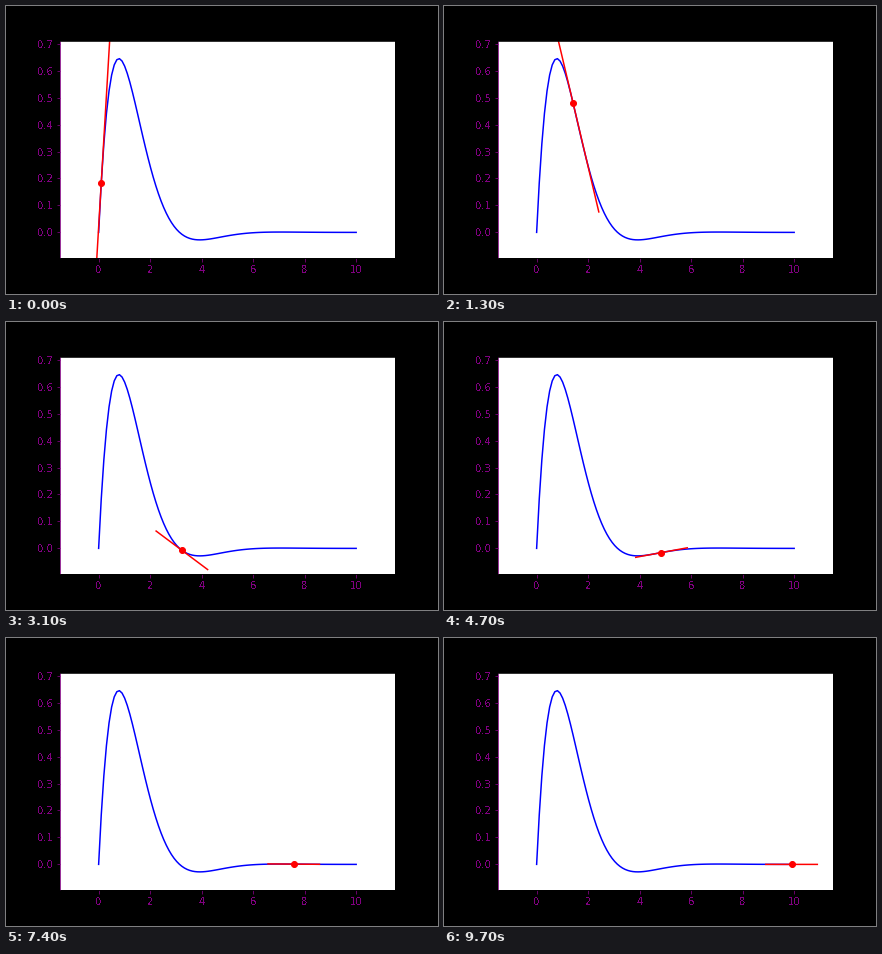
A matplotlib script for the animation above (9800 ms loop, 432x288 px).

```python
import numpy as np
import matplotlib.pyplot as plt
from matplotlib.animation import FuncAnimation

INK = "purple"
FRAMES = 98

plt.rcParams["font.family"] = "DejaVu Sans"
plt.rcParams["text.antialiased"] = False


def curve(x):
    return 2 * np.exp(-x) * np.sin(x)


def slope(x):
    return 2 * np.exp(-x) * (np.cos(x) - np.sin(x))


xs = np.linspace(0, 10, 100)
ys = curve(xs)

fig = plt.figure(figsize=(6, 4), dpi=72, facecolor="black")
ax = fig.add_axes([0.125, 0.125, 0.775, 0.755])
ax.plot(xs, ys, color="blue", lw=1.5)

pad = 0.1 * np.ptp(ys)
ax.set_xlim(-1.5, 11.5)
ax.set_ylim(ys.min() - pad, ys.max() + pad)
ax.set_xticks(range(0, 11, 2))
ax.set_yticks(np.arange(8) / 10)
ax.tick_params(colors=INK, labelsize=10)
ax.spines["left"].set_color(INK)

tangent, = ax.plot([], [], color="red", lw=1.5)
dot, = ax.plot([], [], "o", color="red", ms=6)


def update(i):
    x = xs[i + 1]
    y = curve(x)
    reach = np.array([-1, 1])
    tangent.set_data(x + reach, y + slope(x) * reach)
    dot.set_data([x], [y])
    return tangent, dot


anim = FuncAnimation(fig, update, frames=FRAMES, interval=100,
                     init_func=lambda: update(0), repeat=True, repeat_delay=0)
plt.show()
```
